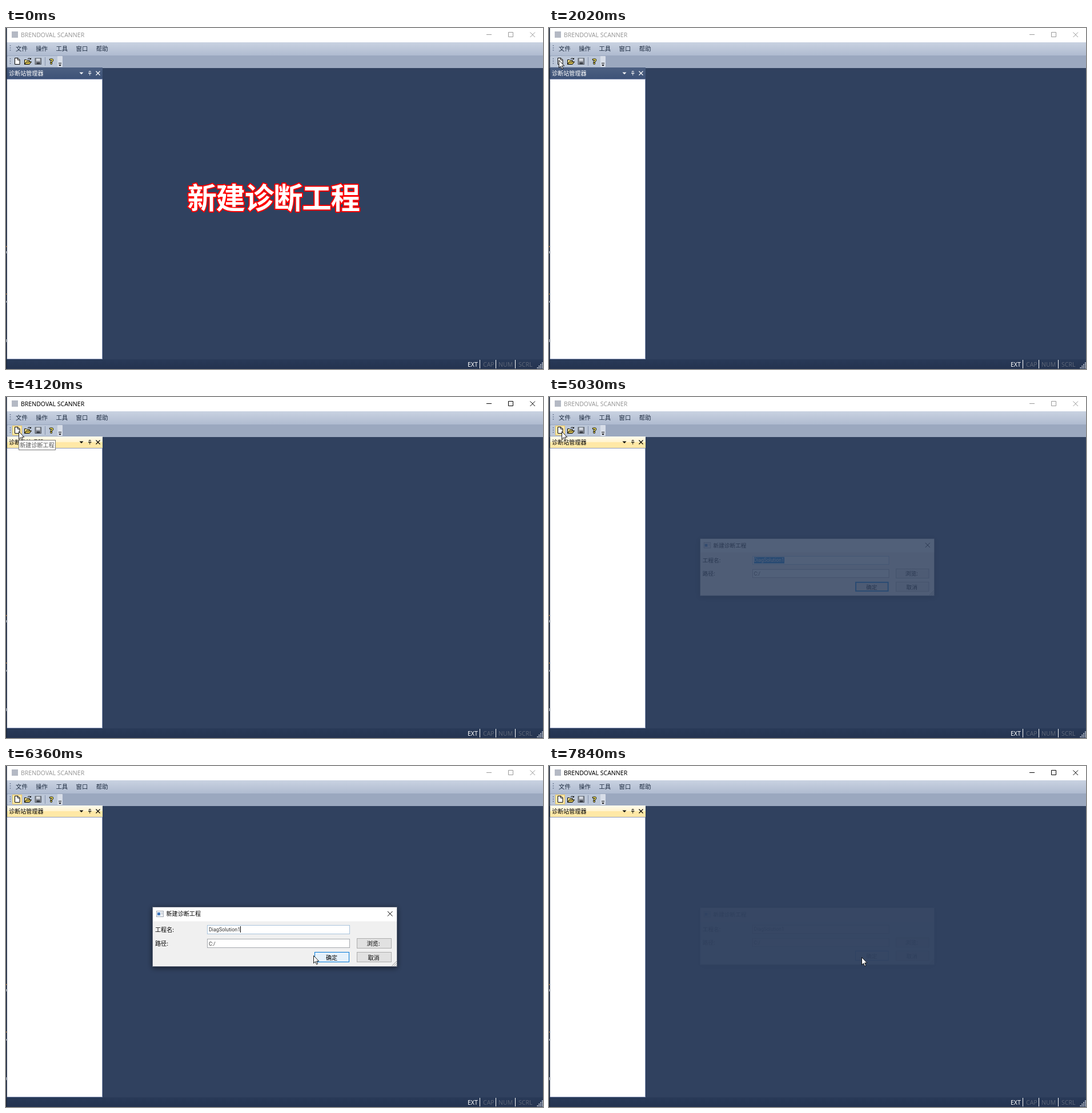
These frames come from a looping animation (940x596 px, 8000 ms). An HTML page:

```html
<!DOCTYPE html>
<html lang="zh-CN">
<head>
<meta charset="utf-8">
<title>新建诊断工程</title>
<style>
html, body { margin: 0; width: 100%; height: 100%; overflow: hidden; background: #30415f; }
svg { display: block; width: 940px; height: 596px; font: 10.1px "Noto Sans CJK SC", "Noto Sans CJK", sans-serif; }
text { white-space: pre; }
.latin { font-family: "Noto Sans", "Open Sans", sans-serif; }
.field { font: 8.9px Roboto, "Liberation Sans", sans-serif; }
.mid { text-anchor: middle; }
.line { fill: none; stroke: #000; }
.box { fill: #fff; stroke: #a5a8ad; }
.btn { fill: #e1e1e1; stroke: #adadad; }
</style>
</head>
<body>
<svg viewBox="0 0 940 596">
  <defs>
    <linearGradient id="menu" x2="0" y2="1"><stop stop-color="#c9d2e1"/><stop offset="1" stop-color="#afbbd0"/></linearGradient>
    <linearGradient id="idle" x2="0" y2="1"><stop stop-color="#4d6082"/><stop offset="1" stop-color="#3d5277"/></linearGradient>
    <linearGradient id="active" x2="0" y2="1">
      <stop stop-color="#fffbee"/><stop offset=".5" stop-color="#fff3cd"/>
      <stop offset=".5" stop-color="#ffe8a6"/><stop offset="1" stop-color="#ffe8a6"/>
    </linearGradient>
    <linearGradient id="status" x2="0" y2="1"><stop stop-color="#293a58"/><stop offset="1" stop-color="#243350"/></linearGradient>
    <filter id="shadow" x="-10%" y="-30%" width="120%" height="160%">
      <feDropShadow dx="0" dy="2" stdDeviation="5" flood-color="#000" flood-opacity=".55"/>
    </filter>
  </defs>

  <!-- Main window -->
  <rect width="940" height="596" fill="#30415f"/>
  <rect width="940" height="25" fill="#fff"/>
  <rect x="10" y="6" width="11" height="11" fill="#b4b9c4"/>
  <g id="caption">
    <text class="latin" x="26" y="16" font-size="10.5">BRENDOVAL SCANNER</text>
    <path fill="none" stroke="currentColor" d="M841 11.5h9M879.5 7.5h8v8h-8zM917.5 7.5l8.5 8.5m0-8.500l-8.500 8.500"/>
  </g>
  <rect y="25" width="940" height="23" fill="url(#menu)"/>
  <rect y="48" width="940" height="22" fill="#9ba8bf"/>
  <rect x="2" y="49" width="97" height="19" rx="2" fill="#bcc7d8"/>
  <rect x="90" y="49" width="9" height="19" rx="1" fill="#d7dde8"/>
  <path stroke="#5c6a85" stroke-width="1.5" stroke-dasharray="1.5 2.5" d="M7.5 30v12M7.5 53v12"/>
  <g id="menus" font-size="10.4" fill="#1b293e"></g>

  <!-- Toolbar icons -->
  <rect id="newButton" x="11.5" y="50.5" width="16" height="16" stroke="#e5c365"/>
  <g stroke="#000">
    <path fill="#fff" d="M15.5 52.5h5.5l3 3v8h-8.5z"/>
    <path fill="none" d="M20.5 52.5v3.5h3.5"/>
    <path fill="#f7e58a" d="M32.5 63.5v-8h3l1 1h4.5v2.5"/>
    <path fill="#c9b24c" d="M32.5 63.5l3-4.5h9l-3.5 4.5z"/>
    <path fill="none" d="M38 54q2.5-2.5 5 0m.5-1.5v2h-2"/>
  </g>
  <rect x="51" y="53" width="10.5" height="10.5" fill="#8c919b" stroke="#50565f"/>
  <path fill="#d9dde4" d="M53 53.5h6.5v4h-6.5z"/>
  <path fill="#3f444c" d="M53.5 60h6v3.5h-6z"/>
  <path stroke="#8593ac" d="M68.5 51v15"/>
  <text class="latin mid" x="79.5" y="63" font-size="13" font-weight="700" fill="#f3e25a" stroke="#000" stroke-width="1.6" paint-order="stroke">?</text>
  <path d="M92 61h5v1h-5zM92 64h5l-2.5 2.5z"/>

  <!-- Side panel -->
  <rect id="panelHead" x="2" y="69" width="167" height="20"/>
  <rect x="1.5" y="89.5" width="167" height="489" fill="#fff" stroke="#8e9bbc"/>
  <g id="panelLabel">
    <text x="5" y="83">诊断站管理器</text>
    <path fill="currentColor" d="M128.5 77.5h7l-3.5 3.5z"/>
    <path fill="none" stroke="currentColor" stroke-width=".8" d="M145.5 75.5h2.500v4h-2.500zM144 79.500h5.500M146.700 80v3"/>
    <path fill="none" stroke="currentColor" stroke-width="1.2" d="M157.500 75.500l7 7m0-7l-7 7"/>
  </g>

  <!-- Status bar -->
  <rect y="579" width="940" height="17" fill="url(#status)"/>
  <g id="flags" class="latin" font-size="10.5"></g>
  <path stroke="#fff" d="M829.500 580v15M857.500 580v15M891.500 580v15"/>
  <g id="grip" fill="#d5dae3"></g>

  <rect width="1.6" height="596" fill="#1c2638"/>
  <path fill="#d9822b" d="M0 381h1v2h-1zM0 464h1v2h-1z"/>
  <path fill="#c8ccd2" d="M0 390h1v4h-1zM0 477h1v3h-1zM0 544h1v5h-1z"/>

  <text id="headline" class="mid" x="468" y="316" font-size="51.5" letter-spacing="-1.3" font-weight="700" fill="#fff" stroke="#f00" stroke-width="4" stroke-linejoin="round" paint-order="stroke">新建诊断工程</text>

  <g id="tip">
    <rect x="22.5" y="75.5" width="64" height="17" fill="#fff" stroke="#767676"/>
    <text class="mid" x="54.5" y="88" fill="#575757">新建诊断工程</text>
  </g>

  <!-- Dialog -->
  <g id="dialog">
    <rect x="256.5" y="246.5" width="428" height="104" fill="#f0f0f0" stroke="#5b6577" filter="url(#shadow)"/>
    <rect x="257" y="247" width="427" height="24.5" fill="#fff"/>
    <rect x="263.5" y="253.5" width="12" height="10" fill="#eef1f5" stroke="#a3abb6"/>
    <path fill="#3f78bd" d="M265 256h5v5h-5z"/>
    <path stroke="#a3abb6" d="M272 256.5h2M272 258.5h2"/>
    <text x="280.5" y="262">新建诊断工程</text>
    <path id="dialogClose" class="line" d="M668 254l8.5 8.5m0-8.5l-8.5 8.5"/>
    <text x="261" y="290">工程名:</text>
    <text x="261" y="314">路径:</text>
    <rect id="nameBox" class="box" x="352.5" y="278.5" width="249" height="15"/>
    <rect class="box" x="352.5" y="302.5" width="249" height="15"/>
    <rect id="selection" x="355" y="280" width="55.5" height="11.5" fill="#0078d7"/>
    <text id="name" class="field" x="355" y="289">DiagSolution1</text>
    <text class="field" x="355" y="313.5" fill="#333">C:/</text>
    <rect id="caret" x="410" y="280" width="1" height="11"/>
    <rect class="btn" x="614.5" y="301.5" width="60" height="17"/>
    <rect class="btn" x="614.5" y="325.5" width="60" height="17"/>
    <rect id="ok"/>
    <text class="mid" x="643" y="314">浏览:</text>
    <text class="mid" x="643.5" y="338.5">取消</text>
    <text class="mid" x="570" y="338.5">确定</text>
    <path stroke="#999" d="M675.5 349.5l9-9M679 349.5l5.5-5.5M682.5 349.5l2-2"/>
  </g>

  <g id="cursor">
    <path id="arrow" fill="#fff" stroke="#000" stroke-width=".9" d="M.5.5v13.2l3-2.900 2.100 4.900 2.100-.9-2.100-4.700h4.100z"/>
    <path id="beam" class="line" d="M-2.500-6.500h2l.5.500.500-.500h2M0-6v12M-2.500 6.500h2l.5-.5.500.500h2"/>
  </g>
</svg>
<script>
const LOOP = 8000;
const $ = id => document.getElementById(id);
const set = (id, attrs) => {
  for (const key in attrs) $(id).setAttribute(key, attrs[key]);
};
const show = (id, on) => set(id, { visibility: on ? 'visible' : 'hidden' });

['文件', '操作', '工具', '窗口', '帮助'].forEach((label, i) =>
  $('menus').innerHTML += `<text x="${17 + 35.2 * i}" y="40">${label}</text>`);
[['EXT', 808], ['CAP', 835], ['NUM', 862], ['SCRL', 897]].forEach(([label, x], i) =>
  $('flags').innerHTML += `<text x="${x}" y="592" fill="${i ? '#5c6577' : '#fff'}">${label}</text>`);
for (let row = 0; row < 4; row++)
  for (let col = 0; col <= row; col++)
    $('grip').innerHTML += `<rect x="${938 - 2.8 * col}" y="${593 - 2.8 * (3 - row)}" width="1.8" height="1.8"/>`;

// Pointer keys: time, x, y
const KEYS = [
  [1330, 883, 231], [1406, 883, 231], [2014, 17, 56],
  [2494, 17, 56], [2722, 48, 145], [2798, 48, 145], [2950, 22, 78], [3254, 22, 61],
  [3400, 22, 61], [3401, 22, 60],
  [5424, 22, 60], [5880, 440, 285], [5956, 440, 285], [6260, 536, 330],
  [6588, 547, 334]
];
const MOVES = [1330, 2570, 3410, 5500, 6360];
const STEP = 76;

function pointer(t) {
  const start = MOVES.filter(m => m <= t).pop() ?? MOVES[0];
  const q = start + STEP * Math.min(10, Math.floor(Math.max(0, t - start) / STEP));
  const i = KEYS.findIndex(key => key[0] > q);
  if (i < 0) return KEYS.at(-1).slice(1);
  const [t0, x0, y0] = KEYS[i - 1], [t1, x1, y1] = KEYS[i];
  const u = (q - t0) / (t1 - t0), e = u * u * (3 - 2 * u);
  return [x0 + (x1 - x0) * e, y0 + (y1 - y0) * e].map(Math.round);
}

// Dialog stages: time, opacity, scale
const STAGES = [
  [0, 0, 1], [5030, .16, .958], [5110, .62, .982], [5180, .92, .995], [5260, 1, 1],
  [7770, .4, .973], [7840, .03, .958]
];

function draw(t) {
  const within = (from, to) => t >= from && t < to;
  const mainActive = within(2798, 5030) || t >= 7700;
  const panelActive = t >= 2798;
  const ink = mainActive ? '#000' : '#999';
  set('caption', { fill: ink, color: ink });
  const label = panelActive ? '#000' : '#fff';
  set('panelLabel', { fill: label, color: label });
  set('panelHead', { fill: `url(#${panelActive ? 'active' : 'idle'})` });

  show('headline', t < 500);
  show('newButton', t >= 3178);
  set('newButton', { fill: within(4810, 5030) ? '#ffd980' : '#ffe9a8' });
  set('tip', { opacity: within(3950, 4810) ? Math.min(3, 1 + Math.floor((t - 3950) / 85)) / 3 : 0 });

  const [, opacity, scale] = STAGES.filter(s => s[0] <= t).pop();
  const shift = scale < 1 ? -1 : 0;
  set('dialog', {
    opacity,
    transform: `translate(${471 + shift} ${298.5 + shift}) scale(${scale}) translate(-471 -298.5)`
  });
  show('dialogClose', t < 7700);
  show('selection', t < 6000);
  set('name', { fill: t < 6000 ? '#fff' : '#333' });
  show('caret', within(6000, 6530) || within(7060, 7520));
  $('nameBox').style.stroke = t < 7520 ? '#a9c4dc' : '#a5a8ad';

  const hover = t >= 6360, pressed = within(7520, 7700);
  const inset = hover ? .5 : 1;
  set('ok', {
    x: 540 + inset, y: 325 + inset, width: 61 - 2 * inset, height: 18 - 2 * inset,
    fill: pressed ? '#cce4f7' : hover ? '#e5f1fb' : '#e1e1e1',
    stroke: pressed ? '#005499' : '#0078d7',
    'stroke-width': 2 * inset
  });

  const [x, y] = pointer(t);
  const overField = within(5260, 7700) && x > 352 && x < 602 && y > 278 && y < 294;
  set('cursor', { transform: `translate(${x} ${y})` });
  show('arrow', t >= 1330 && !overField);
  show('beam', t >= 1330 && overField);
}

const begin = performance.now();
function frame() {
  draw((performance.now() - begin) % LOOP);
  requestAnimationFrame(frame);
}
frame();
</script>
</body>
</html>
```
